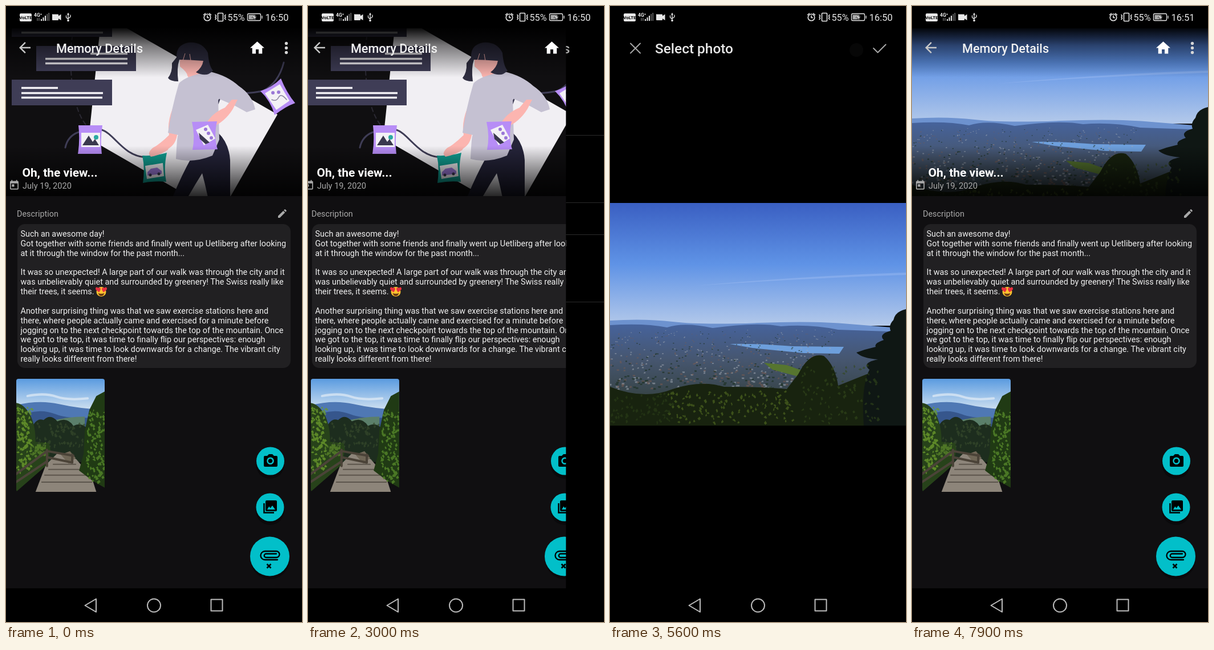
Recreate the animation shown at these times as an HTML page. Size 519x1079 px, loop 8000 ms.

```html
<!DOCTYPE html>
<html lang="en">
<head>
<meta charset="utf-8">
<title>Memory Details</title>
<style>
html, body { margin: 0; width: 100%; height: 100%; overflow: hidden; background: #000; }
svg { display: block; }
#stage { width: 100%; height: 100%; }
text { font-family: Roboto, "Noto Sans", sans-serif; white-space: pre; }
.m { font-weight: 500; }
.b { font-weight: 700; }
.mid { text-anchor: middle; }
.line { fill: none; stroke-linecap: round; stroke-linejoin: round; }
</style>
</head>
<body>
<svg id="stage" viewBox="0 0 519 1079">
<defs>
  <linearGradient id="topShade" x2="0" y2="1"><stop stop-color="#000" stop-opacity=".95"/><stop offset=".35" stop-color="#000" stop-opacity=".5"/><stop offset="1" stop-color="#000" stop-opacity="0"/></linearGradient>
  <linearGradient id="lowShade" x2="0" y2="1"><stop stop-color="#000" stop-opacity="0"/><stop offset="1" stop-color="#000" stop-opacity=".85"/></linearGradient>
  <linearGradient id="citySky" x2="0" y2="1"><stop stop-color="#3a5fc2"/><stop offset=".5" stop-color="#5f93e6"/><stop offset="1" stop-color="#b4c9ea"/></linearGradient>
  <linearGradient id="cityLand" x2="0" y2="1"><stop stop-color="#46639c"/><stop offset=".35" stop-color="#46566f"/><stop offset="1" stop-color="#2a3526"/></linearGradient>
  <linearGradient id="hillSky" x2="0" y2="1"><stop stop-color="#5a9be0"/><stop offset="1" stop-color="#dce8f2"/></linearGradient>
  <linearGradient id="wall" x2="1" y2="1"><stop stop-color="#b3aaa7"/><stop offset="1" stop-color="#c3bbb7"/></linearGradient>
  <clipPath id="coverClip"><rect y="39" width="519" height="294"/></clipPath>
  <clipPath id="edge"><rect id="edgeRect" y="39" width="519" height="981"/></clipPath>
  <clipPath id="menuClip"><rect id="menuRect" y="44"/></clipPath>
  <clipPath id="hillClip"><rect x="18" y="653" width="155" height="198" rx="4"/></clipPath>
  <clipPath id="leafClip"><rect x="29" y="420" width="79" height="79" rx="9"/></clipPath>

  <symbol id="city" viewBox="0 0 519 390" preserveAspectRatio="xMidYMid slice">
    <rect width="519" height="215" fill="url(#citySky)"/>
    <path d="M150 145Q340 128 519 122V126Q340 132 150 145Z" fill="#a9c4f2" opacity=".35"/>
    <path d="M0 206Q60 202 110 208T260 210 420 212L519 220V240H0Z" fill="#6d92cf"/>
    <path d="M0 214Q60 210 100 218 130 208 180 219 260 208 300 216 350 212 400 222L519 226V390H0Z" fill="url(#cityLand)"/>
    <path d="M210 247Q260 246 320 251L410 252 402 264 340 263 250 254Z" fill="#6d9fdc"/>
    <g id="houses"></g>
    <path d="M270 280 310 284 355 300 330 304 285 292Z" fill="#56752f"/>
    <path d="M30 336H80V341H30Z" fill="#5b8a3a"/>
    <path d="M0 322Q60 346 110 326 160 310 200 322 270 322 310 326L330 300Q350 260 375 268 395 285 400 320L450 300H519V390H0Z" fill="#18230f"/>
    <path d="M519 186Q500 190 497 205 488 214 492 224 470 230 480 240 462 246 466 252 448 256 432 262 442 272 470 274 440 280 455 292 440 320 445 390H519Z" fill="#0f1714"/>
    <g id="bushes"></g>
  </symbol>

  <symbol id="hill" viewBox="0 0 155 197" preserveAspectRatio="xMidYMid slice">
    <rect width="155" height="60" fill="url(#hillSky)"/>
    <path d="M20 30Q50 24 70 31T125 34" class="line" stroke="#eef4f8" stroke-width="4" opacity=".6"/>
    <path d="M0 46Q40 36 75 44T155 54V110H0Z" fill="#4f78b4"/>
    <path d="M20 60Q45 52 70 62T155 66V110H20Z" fill="#36568c"/>
    <path d="M60 74Q90 66 120 66V95H60Z" fill="#5b7f6a"/>
    <path d="M25 90Q35 66 48 72 60 60 72 74 90 66 100 82 115 74 128 90V145H25Z" fill="#1d2d1e"/>
    <path d="M52 150 74 128 105 140 132 172 140 197H34Z" fill="#8d857a"/>
    <path d="M57 158H112M50 168H122M45 180H132M65 149H104" class="line" stroke="#5c554c" stroke-width="2"/>
    <path d="M78 132 94 126 104 138 92 148Z" fill="#6f6656"/>
    <path d="M0 42Q14 44 24 62 34 80 34 110L58 112 60 124 54 150 0 197Z" fill="#27421a"/>
    <path d="M155 22 140 30 128 54 120 90 118 130 110 160 134 178 155 190Z" fill="#203a14"/>
    <g id="hedges"></g>
    <path d="M0 166 54 126 100 134M0 180 54 144M54 124V152M98 132V146M56 137 98 146" class="line" stroke="#4b4338" stroke-width="4"/>
  </symbol>

  <symbol id="leaves" viewBox="0 0 100 100"><rect width="100" height="100" fill="#34491f"/><g id="foliage"></g></symbol>
</defs>

<rect width="519" height="1079"/>

<g id="detail">
  <rect y="39" width="519" height="981" fill="#100f11"/>
  <g clip-path="url(#coverClip)">
    <g id="art">
      <path d="M212 39 476 190 390 340H332L145 232 150 185 165 39Z" fill="#f1eff3"/>
      <path d="M114 114Q118 180 140 208M118 39 114 70" class="line" stroke="#2b2933" stroke-width="2" stroke-dasharray="7 6"/>
      <g fill="#3f3d56"><path d="M10 9H186V54H10ZM53 70H228V114H53ZM10 129H186V174H10Z"/></g>
      <path d="M27 46.5H170M148 83.5H213M69 92.5H213M69 100.5H213M27 143.5H91M27 152.5H170M27 160.5H169" stroke="#f4f2f6" stroke-width="3.4"/>
      <g class="line" stroke="#3f3d56" stroke-width="3">
        <path d="M104 248Q108 228 127 221M168 217C190 224 205 262 244 265M350 210Q380 160 375 153.5C405 154 425 154 450 149Q478 135 487 99"/>
      </g>
      <path d="M335 245 372 222Q391 240 393 270V340H355Q350 315 344 293 330 315 316 340H290Q306 300 326 264Z" fill="#25243a"/>
      <path d="M292 180Q282 205 286 226 272 240 256 250 248 258 258 264 276 258 290 246 302 236 302 205Z" fill="#fcb5b0"/>
      <path d="M305 88V106Q318 116 318 122L324 132H352L347 85Z" fill="#fcb5b0"/>
      <path d="M303 136Q314 122 358 115 388 122 408 140 432 156 437 181L422 186 400 174 372 162 374 234 362 262Q328 276 298 268 300 225 302 226L284 222Q290 180 303 136Z" fill="#c5c1d2"/>
      <path d="M406 164 398 180Q384 203 360 213L350 208Q360 188 384 178L396 164Z" fill="#fcb5b0"/>
      <path d="M299 90Q298 68 320 64 344 62 354 82 356 106 363 113 352 126 333 116 344 108 346 96 320 94 304 94 299 108 302 132 288 132 284 126 292 116 291 100 299 90Z" fill="#2f2e41"/>
      <path d="M314 83 310 96M322 84 324 96" stroke="#fcb5b0" stroke-width="1"/>
      <path d="M127 209H169Q165 235 168 259H126Q130 235 127 209Z" fill="#b78df6"/>
      <path d="M326 203 370 202Q364 230 371 251L327 252Q332 228 326 203Z" fill="#b78df6"/>
      <path d="M446 149Q466 143 482 127 492 152 507 170 490 176 471 191 464 166 446 149Z" fill="#b78df6"/>
      <path d="M239 262Q262 263 282 257 276 285 281 308 262 306 240 310 244 284 239 262Z" fill="#109e91"/>
      <g fill="#f3f1f5"><path d="M132 222H165V247H132Z"/><path d="M333 217 354 208 367 232 347 244Z"/><path d="M454 153 480 137 497 166 474 182Z"/><path d="M244 280 275 275 277 298 247 303Z"/></g>
      <circle cx="158" cy="230" r="4" fill="#2baaa2"/>
      <path d="M134 244 145 227 152 238 156 233 163 244Z" fill="#3a384e"/>
      <path d="M338 222 357 239 350 242 340 233Z" fill="#3a384e"/>
      <g fill="#9a78d6"><circle cx="350" cy="216" r="3"/><circle cx="355" cy="223" r="3"/><circle cx="360" cy="231" r="3"/><circle cx="468" cy="152" r="3"/><circle cx="478" cy="151" r="3"/><path d="M248 291 254 285 265 283 273 289V294L248 297Z"/></g>
      <path d="M466 164Q474 168 478 160T492 164" class="line" stroke="#8b86a0" stroke-width="1.5"/>
      <g fill="#3a384e"><circle cx="253" cy="296" r="2.5"/><circle cx="268" cy="294" r="2.5"/></g>
      <path d="M258 248Q246 258 254 264 268 262 284 252L286 234Z" fill="#fcb5b0"/>
    </g>
    <use id="cover" href="#city" y="39" width="519" height="294"/>
    <rect y="39" width="519" height="86" fill="url(#topShade)"/>
    <rect y="245" width="519" height="89" fill="url(#lowShade)"/>
  </g>
  <g fill="#fff">
    <path fill="#c8c8c8" transform="translate(18 58) scale(1.25)" d="M20 11H7.8l5.6-5.6L12 4l-8 8 8 8 1.4-1.4L7.8 13H20z"/>
    <path transform="translate(425.5 58.5) scale(1.25)" d="M10 20v-6h4v6h5v-8h3L12 3 2 12h3v8z"/>
    <g fill="#d5d5d5"><circle cx="491.5" cy="65.5" r="2.7"/><circle cx="491.5" cy="73.5" r="2.7"/><circle cx="491.5" cy="81.5" r="2.7"/></g>
    <text class="m" x="88" y="81.5" font-size="21.6" fill="#f2f2f2">Memory Details</text>
    <text class="b" x="28.5" y="298.5" font-size="21">Oh, the view...</text>
    <g fill="#a9a9a9">
      <text x="29" y="319.5" font-size="14.6">July 19, 2020</text>
      <text x="19" y="368.5" font-size="14.4">Description</text>
      <path transform="translate(4.5 304) scale(.83)" d="M19 3h-1V1h-2v2H8V1H6v2H5a2 2 0 0 0-2 2v14a2 2 0 0 0 2 2h14a2 2 0 0 0 2-2V5a2 2 0 0 0-2-2zm0 16H5V8h14zM7 10h5v5H7z"/>
      <path transform="translate(474.5 353.5) scale(.83)" d="M3 17.25V21h3.75L17.8 9.94l-3.75-3.75zM20.7 7.04a1 1 0 0 0 0-1.41l-2.34-2.34a1 1 0 0 0-1.41 0l-1.83 1.83 3.75 3.75z"/>
    </g>
  </g>
  <rect x="20" y="382" width="479" height="252" rx="13" fill="#212022"/>
  <g id="story" fill="#f0f0f0" font-size="14.4"></g>
  <circle cx="167" cy="500.5" r="8.5" fill="#fbc42f"/>
  <path id="heart" d="M163 501.5l-5.5-4.5q-1.5-4 1.5-4.5 2 0 2.8 1.8 1.8-2 3.6-.5 2 2.5-2.4 7.7z" fill="#e8303f"/>
  <use href="#heart" transform="translate(334 0) scale(-1 1)"/>
  <path d="M161.5 503Q167 505 172.5 503 171 508 167 508T161.5 503Z" fill="#6b3a14"/>
  <g clip-path="url(#hillClip)"><use href="#hill" x="18" y="653" width="155" height="198"/></g>

  <g opacity=".35"><circle cx="463" cy="803" r="25"/><circle cx="463" cy="884" r="25"/><circle cx="463" cy="970" r="34"/></g>
  <g fill="#02bfc9"><circle cx="463.5" cy="797" r="24.5"/><circle cx="463" cy="878" r="24.5"/><circle cx="462.5" cy="964" r="34.5"/></g>
  <path fill-rule="evenodd" d="M452 807V790q0-2 2-2h4l3-3h6l3 3h4q2 0 2 2v15q0 2-2 2h-20q-2 0-2-2ZM463.5 790.5a6.3 6.3 0 1 0 .1 0zM463.5 793a3.8 3.8 0 1 1-.1 0z"/>
  <path fill-rule="evenodd" d="M457 866h16q2 0 2 2v15q0 2-2 2h-16q-2 0-2-2v-15q0-2 2-2zM458 882h14l-5-7-3.5 4.5-2.3-3z"/>
  <path d="M452.5 871v16.5H470" fill="none" stroke="#000" stroke-width="2.5"/>
  <path d="M476 970H454a7.5 7.5 0 0 1 0-15h20a5.5 5.5 0 0 1 0 11H456a3 3 0 0 1 0-6.5H474" class="line" stroke="#000" stroke-width="2.3"/>
  <path d="M457.5 977.5l7 7m0-7l-7 7" stroke="#000" stroke-width="2.6"/>
</g>

<g id="menu" clip-path="url(#menuClip)" font-size="17">
  <rect x="274" y="44" width="240" height="196" rx="4" fill="#29292b"/>
  <text x="293.5" y="90" fill="#f2f2f2">Change cover photo</text>
  <g fill="#c46d6d"><text x="293" y="149">Delete memory</text><text x="293" y="207.5">Delete all images</text></g>
</g>

<rect id="scrim" y="39" width="519" height="981"/>
<g id="sheet">
  <rect x="20" y="736" width="479" height="264" rx="22" fill="#252427"/>
  <text class="m" x="49" y="778" font-size="20.7" fill="#b5b5b6">Open with</text>
  <rect x="110" y="804" width="78" height="79" rx="7" fill="#39393b"/>
  <g fill="#fff"><rect x="118" y="812" width="62" height="62" rx="12"/><rect x="339" y="812" width="62" height="62" rx="12"/></g>
  <rect x="129" y="824" width="40" height="40" fill="#3f82d8"/>
  <circle cx="370" cy="843" r="22" fill="#4285d8"/>
  <g class="mid" font-size="15.2" fill="#a5a5a6"><text x="149" y="901.5">Gallery</text><text x="369.5" y="901.5">Images</text></g>
  <g class="mid m" font-size="16.9" fill="#3f8ddd"><text x="147" y="972">JUST ONCE</text><text x="372" y="972">ALWAYS</text></g>
  <path d="M259.5 951V980" stroke="#454547" stroke-width="1.3"/>
</g>

<g clip-path="url(#edge)">
  <rect y="39" width="519" height="981"/>
  <g id="picker">
    <g id="list">
      <rect x="29" y="127" width="79" height="79" rx="9" fill="url(#wall)"/>
      <path d="M71 167H85V179H71Z" fill="#cfc8c4"/><path d="M74 171H83V174H74Z" fill="#8d8581"/>
      <rect x="29.5" y="246.5" width="78" height="77" rx="9" fill="#050505" stroke="#141414"/>
      <path d="M30 254H107M30 296H107" stroke="#333" stroke-width="1.5"/>
      <g font-size="4" fill="#777"><text x="41" y="251">Search in settings</text><text x="41" y="262">Today at half past ten</text><text x="41" y="272.5">Sunday, after lunch</text><text x="41" y="283">Friday the tenth</text><text x="41" y="293" fill="#4560a0">See all entries</text><text x="41" y="303">More from this week</text></g>
      <g clip-path="url(#leafClip)"><use href="#leaves" x="29" y="420" width="79" height="79"/></g>
      <path d="M132 226.5H471M132 344.5H471M132 400.5H471M132 518.5H471" stroke="#2b2b2b"/>
      <path d="M478.5 159.5l7.5 7.5-7.5 7.5M478.5 278l7.5 7.5-7.5 7.5M478.5 452l7.5 7.5-7.5 7.5" class="line" stroke="#8c8c8c" stroke-width="1.8"/>
      <g class="m" fill="#a9a9a9">
        <text x="79" y="82.5" font-size="24.4">Select images</text>
        <text x="28.5" y="385" font-size="18.8">MORE ALBUMS</text>
        <g font-size="16.8"><text x="127" y="162.5">Camera</text><text x="127" y="281">Screenshots</text><text x="127" y="455">Images</text></g>
      </g>
      <g font-size="14.5" fill="#747474"><text x="127" y="185.5">3,824</text><text x="127" y="304">1,238</text><text x="127" y="477.5">3</text></g>
    </g>
    <g id="grid">
      <text class="m" x="79" y="82.5" font-size="24.4" fill="#a9a9a9">Select photo</text>
      <use href="#leaves" y="108" width="128" height="128"/>
      <use href="#city" x="131" y="108" width="128" height="128"/>
      <use href="#hill" x="261" y="108" width="128" height="128"/>
    </g>
    <path id="cross" d="M36 65.5l17 17m0-17l-17 17" class="line" stroke="#fff" stroke-width="1.9"/>
    <g id="viewer">
      <use id="picture" href="#city"/>
      <circle cx="432" cy="77" r="12" fill="#070707"/>
      <text class="m" x="79" y="82.5" font-size="24.4" fill="#e8e8e8">Select photo</text>
      <path d="M36 65.5l17 17m0-17l-17 17M462 74l7.5 7.5 14-14" class="line" stroke="#a9a9a9" stroke-width="1.9"/>
    </g>
  </g>
</g>

<rect y="1020" width="519" height="59"/>
<g class="line" stroke="#bdbdbd" stroke-width="2"><path d="M138.5 1050 158 1038.5V1061.5Z"/><circle cx="259.5" cy="1050" r="11.5"/><rect x="359.5" y="1039.5" width="20" height="20"/></g>

<rect width="519" height="39"/>
<g fill="#e8e8e8">
  <rect x="24" y="13" width="21" height="14" rx="2"/>
  <text class="b mid" x="34.5" y="23" font-size="8" fill="#000">VoLTE</text>
  <text class="b" x="49" y="18.5" font-size="8.5">4G⁺</text>
  <path d="M61 23h2v3h-2zM64.5 20h2v6h-2zM68 17h2v9h-2z"/><path d="M71.5 14h1.5v12h-1.5zM74.5 12h1.5v14h-1.5z" opacity=".5"/>
  <path d="M55 21v5m3 0v-5" stroke="#999"/>
  <path d="M82 14.5h9q1 0 1 1v2l4.5-3v10.5l-4.5-3v2q0 1-1 1h-9q-1 0-1-1v-9q0-1 1-1z"/>
  <circle cx="109" cy="25.5" r="1.8"/><path d="M107 15.5l2-4 2 4z"/>
  <path d="M109 14v11M105.5 17v3l3.5 3M113 16v3l-4 3" class="line" stroke="#e8e8e8" stroke-width="1.3"/>
  <g class="line" stroke="#e8e8e8" stroke-width="1.6"><circle cx="353" cy="20" r="5.8"/><path d="M353 17v3.5h2.5M346.5 15.5l3-2.5M359.5 15.5l-3-2.5"/><rect x="371.5" y="12.5" width="9" height="14" rx="1"/><path d="M367 15.5l1.5 2-1.5 2 1.5 2-1.5 2M385 15.5l-1.5 2 1.5 2-1.5 2 1.5 2"/></g>
  <rect x="423.5" y="13.5" width="23" height="12" rx="2" fill="none" stroke="#e8e8e8" stroke-width="1.3"/>
  <path d="M425.5 15.5h12v8h-12zM448 17h1.8v5h-1.8z" fill="#aaa"/>
  <path d="M437 14.5l-6 6h4l-2 4 7-6h-4z" stroke="#000" stroke-width=".6"/>
  <g font-size="16.5"><text x="388.5" y="25.5" font-size="16.2">55%</text><text id="clock" x="454.5" y="25.5"></text></g>
</g>
</svg>

<script>
const LOOP = 8000, W = 519;
const ui = {};
document.querySelectorAll("[id]").forEach(el => ui[el.id] = el);

let seed = 7;
const rnd = (a = 0, b = 1) => {
  seed = seed * 16807 % 2147483647;
  return a + (b - a) * seed / 2147483647;
};
const set = (el, attrs) => { for (const k in attrs) el.setAttribute(k, attrs[k]); };
const show = (el, o) => set(el, { opacity: o, display: o > 0 ? "inline" : "none" });
const path = (d, fill, opacity = 1) => `<path d="${d}" fill="${fill}" opacity="${opacity}"/>`;

// Scatter n marks inside a box; mark(x, y, depth) returns path data.
const scatter = (n, [x0, y0, x1, y1], mark) => {
  let d = "";
  for (let i = 0; i < n; i++) {
    const y = rnd(y0, y1);
    d += mark(rnd(x0, x1), y, (y - y0) / (y1 - y0));
  }
  return d;
};
const house = (x, y, k) => `M${x} ${y}h${1.5 + 5 * k * rnd()}v${1 + 2 * k}h${-1.5 - 3 * k}z`;
const tuft = (x, y) => `M${x} ${y}l${rnd(1, 4)} ${rnd(-4, -1)} ${rnd(1, 3)} ${rnd(2, 5)} ${rnd(-4, -1)} ${rnd(1, 3)}z`;
const leaf = (x, y) => {
  const r = rnd(5, 13), turn = rnd(0, 6.28);
  const pts = Array.from({ length: 20 }, (_, i) => {
    const a = i * Math.PI / 10, q = r * (.68 + .32 * Math.cos(5 * a));
    return [x + q * Math.cos(a + turn), y + q * Math.sin(a + turn)].map(v => v.toFixed(1));
  });
  return "M" + pts.join("L") + "Z";
};

ui.houses.innerHTML =
  path(scatter(230, [0, 222, 390, 325], house), "#a3a9b5", .55) +
  path(scatter(170, [0, 228, 360, 325], house), "#7a5c50", .55) +
  path(scatter(200, [0, 225, 400, 325], house), "#1f3325", .7);
ui.bushes.innerHTML =
  path(scatter(130, [100, 330, 320, 386], tuft), "#4c6420", .7) +
  path(scatter(90, [335, 285, 470, 386], tuft), "#33481c", .6) +
  path(scatter(70, [0, 335, 110, 386], tuft), "#263816", .8);
ui.hedges.innerHTML =
  path(scatter(110, [0, 50, 24, 162], tuft), "#6b9a2c", .8) +
  path(scatter(110, [122, 55, 152, 180], tuft), "#55862a", .8) +
  path(scatter(50, [24, 112, 50, 135], tuft), "#5f8a2b", .7) +
  path(scatter(60, [30, 78, 116, 122], tuft), "#35492c", .7);
ui.foliage.innerHTML = ["#21331a", "#56762f", "#7b9d4a", "#8cb05a"]
  .map((c, i) => path(scatter(26 - 3 * i, [0, 0, 100, 100 - 12 * i], leaf), c, .9)).join("") +
  path(scatter(60, [0, 55, 100, 100], tuft), "#93ab4e", .7);

ui.story.innerHTML = `Such an awesome day!
Got together with some friends and finally went up Uetliberg after looking
at it through the window for the past month...

It was so unexpected! A large part of our walk was through the city and it
was unbelievably quiet and surrounded by greenery! The Swiss really like
their trees, it seems.

Another surprising thing was that we saw exercise stations here and
there, where people actually came and exercised for a minute before
jogging on to the next checkpoint towards the top of the mountain. Once
we got to the top, it was time to finally flip our perspectives: enough
looking up, it was time to look downwards for a change. The vibrant city
really looks different from there!`.split("\n")
  .map((s, i) => `<text x="25.5" y="${404 + 16.85 * i}">${s}</text>`).join("");

const ramp = (t, a, b) => {
  const p = Math.min(1, Math.max(0, (t - a) / (b - a)));
  return p * p * (3 - 2 * p);
};
const mix = (a, b, p) => a + (b - a) * p;

function draw(t) {
  const changed = t > 5000;
  show(ui.art, changed ? 0 : 1);
  show(ui.cover, changed ? 1 : 0);
  ui.clock.textContent = t < 6100 ? "16:50" : "16:51";

  const open = ramp(t, 450, 800), w = 240 * mix(.4, 1, open);
  set(ui.menuRect, { x: 514 - w, width: w, height: 196 * mix(.2, 1, open) });
  show(ui.menu, ramp(t, 450, 620) * (1 - ramp(t, 1650, 1850)));

  const sheet = ramp(t, 1780, 2100) * (1 - ramp(t, 2750, 2980));
  show(ui.scrim, .18 * sheet);
  show(ui.sheet, sheet > 0 ? 1 : 0);
  set(ui.sheet, { transform: `translate(0 ${290 * (1 - sheet)})` });

  // The picker travels half as far as its clipped left edge.
  const away = changed ? ramp(t, 6208, 6608) : 1 - ramp(t, 2900, 3350);
  set(ui.edgeRect, { x: W * away });
  set(ui.picker, { transform: `translate(${W / 2 * away} 0)` });
  set(ui.detail, { transform: `translate(${-101.5 * (1 - away)} 0)` });

  const view = ramp(t, 5150, 5600);
  show(ui.list, 1 - ramp(t, 3820, 4150));
  show(ui.grid, ramp(t, 4100, 4550) * (1 - view));
  show(ui.cross, 1 - view);
  show(ui.viewer, Math.min(1, view * 3));
  set(ui.picture, { x: mix(131, 0, view), y: mix(108, 345, view), width: mix(128, W, view), height: mix(128, 390, view) });
}

const start = performance.now();
(function tick() {
  draw((performance.now() - start) % LOOP);
  requestAnimationFrame(tick);
})();
</script>
</body>
</html>
```
